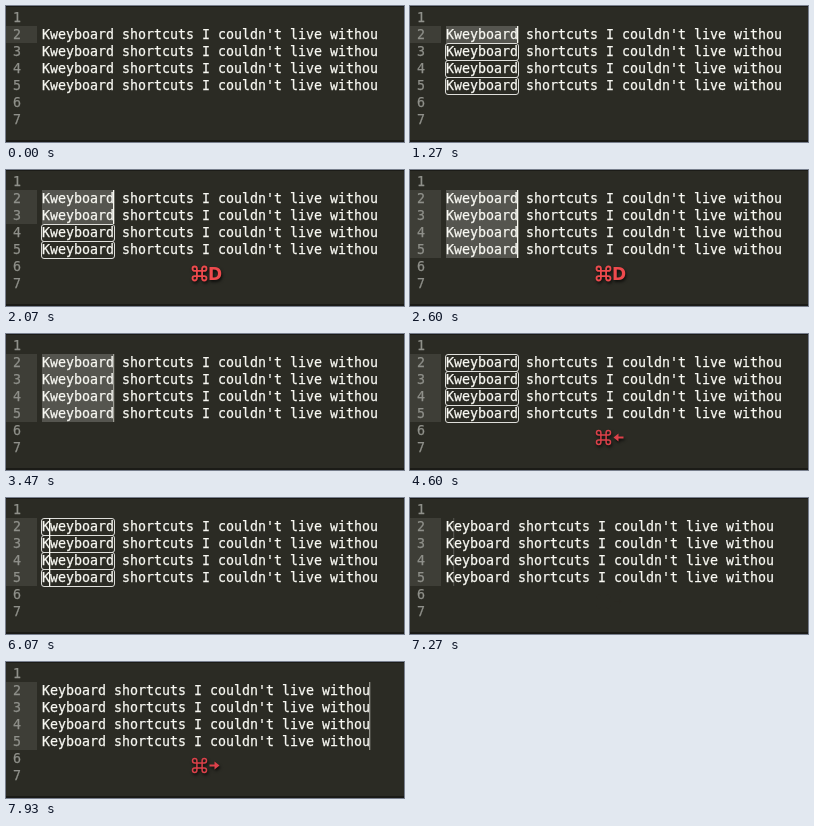
Recreate the animation shown at these times as an HTML page with a canvas. Size 398 by 136 pixels, loop 8 s.

```html
<!DOCTYPE html>
<html lang="en">
<head>
<meta charset="utf-8">
<title>Multiple cursors</title>
<style>
  html, body { margin: 0; width: 100%; height: 100%; overflow: hidden; background: #2b2b24; }
  canvas { display: block; }
</style>
</head>
<body>
<canvas id="stage" width="398" height="136"></canvas>
<script>
const ctx = document.getElementById('stage').getContext('2d');
const LOOP = 8000;
const CHAR = 8, ROW = 17, LEFT = 36, TOP = 3;
const WORD_LENGTH = 9, ROWS = [2, 3, 4, 5];
const REST = ' shortcuts I couldn\'t live withou';

// Editor states: selected rows, outlined rows, rows with a caret, caret column.
const states = [
  { at: 0, word: 'Kweyboard', selected: 0, outlined: [], carets: 1, column: null },
  { at: 1200, blinkFrom: 1270, word: 'Kweyboard', selected: 1, outlined: [3, 4, 5], carets: 1, column: 9 },
  { at: 1930, word: 'Kweyboard', selected: 2, outlined: [4, 5], carets: 2, column: 9 },
  { at: 2200, word: 'Kweyboard', selected: 3, outlined: [5], carets: 3, column: 9 },
  { at: 2470, word: 'Kweyboard', selected: 4, outlined: [], carets: 4, column: 9 },
  { at: 3930, word: 'Kweyboard', selected: 0, outlined: ROWS, carets: 4, column: 0 },
  { at: 4930, word: 'Kweyboard', selected: 0, outlined: ROWS, carets: 4, column: 1 },
  { at: 6330, word: 'Keyboard', selected: 0, outlined: [], carets: 4, column: 1 },
  { at: 7470, word: 'Keyboard', selected: 0, outlined: [], carets: 4, column: 41 }
];

const cues = [
  { key: 'D', start: 1670, end: 2830 },
  { key: 'left', start: 3670, end: 4930 },
  { key: 'right', start: 7270, end: 9000 }
];

const clamp = x => Math.min(1, Math.max(0, x));
const ramp = (t, start, length) => clamp((t - start) / length);
const rowTop = row => TOP + (row - 1) * ROW;

function caretAlpha(age) {
  const phase = Math.max(0, age) % 1340;
  return 1 - ramp(phase, 340, 260) + ramp(phase, 900, 230);
}

// One glyph per cell keeps the columns on whole pixels.
function drawText(text, x, row, color) {
  ctx.fillStyle = ctx.strokeStyle = color;
  ctx.lineWidth = 0.25;
  [...text].forEach((char, i) => {
    ctx.fillText(char, x + i * CHAR, rowTop(row) + 13);
    ctx.strokeText(char, x + i * CHAR, rowTop(row) + 13);
  });
}

function drawEditor(t) {
  const state = states.filter(s => s.at <= t).pop();
  ctx.fillStyle = '#2b2b24';
  ctx.fillRect(0, 0, 398, 136);
  ctx.fillStyle = '#1b1b17';
  ctx.fillRect(0, 0, 398, 1);
  ctx.fillRect(0, 134, 398, 2);

  ctx.fillStyle = '#3e3e37';
  ctx.fillRect(0, rowTop(2), 31, state.carets * ROW);
  ctx.fillStyle = '#55554f';
  ctx.fillRect(LEFT, rowTop(2), WORD_LENGTH * CHAR, state.selected * ROW);

  ctx.font = '13.3px "DejaVu Sans Mono", monospace';
  for (let row = 1; row <= 7; row++) drawText(String(row), 7, row, '#8f908a');
  for (const row of ROWS) drawText(state.word + REST, LEFT, row, '#f8f8f2');

  ctx.strokeStyle = '#dededa';
  ctx.lineWidth = 1;
  for (const row of state.outlined) {
    ctx.beginPath();
    ctx.roundRect(LEFT - 0.5, rowTop(row) + 0.5, WORD_LENGTH * CHAR + 1, ROW, 2.5);
    ctx.stroke();
  }

  if (state.column !== null) {
    ctx.globalAlpha = caretAlpha(t - (state.blinkFrom ?? state.at));
    ctx.fillStyle = '#f8f8f0';
    ctx.fillRect(LEFT + state.column * CHAR - 1, rowTop(2), 1.3, state.carets * ROW);
    ctx.globalAlpha = 1;
  }
}

// Looped square: a side and a three-quarter loop, turned four times.
function drawCommand(x, y, side, radius) {
  const reach = side + radius;
  ctx.save();
  ctx.translate(x, y);
  ctx.beginPath();
  for (let i = 0; i < 4; i++) {
    ctx.moveTo(side, -reach);
    ctx.lineTo(side, reach);
    ctx.arc(reach, reach, radius, Math.PI, -Math.PI / 2, true);
    ctx.rotate(Math.PI / 2);
  }
  ctx.stroke();
  ctx.restore();
}

function drawArrow(x, y, direction) {
  ctx.save();
  ctx.translate(x, y);
  ctx.scale(direction, 1);
  ctx.beginPath();
  ctx.moveTo(5, 0);
  ctx.lineTo(0, -4);
  ctx.lineTo(0, -1);
  ctx.lineTo(-5, -1);
  ctx.lineTo(-5, 1);
  ctx.lineTo(0, 1);
  ctx.lineTo(0, 4);
  ctx.fill();
  ctx.restore();
}

function drawCue(cue, t) {
  const alpha = ramp(t, cue.start, 330) - ramp(t, cue.end, 280);
  if (alpha <= 0) return;
  ctx.save();
  ctx.globalAlpha = alpha;
  ctx.shadowColor = 'rgba(0, 0, 0, 0.75)';
  ctx.shadowBlur = 3;
  ctx.shadowOffsetX = 1;
  ctx.shadowOffsetY = 2;
  ctx.fillStyle = ctx.strokeStyle = cue.key === 'D' ? '#ee4a4d' : '#dc414a';
  ctx.lineWidth = cue.key === 'D' ? 1.8 : 1.5;
  drawCommand(193.5, 103.5, 2.6, 2.2);
  if (cue.key === 'D') {
    ctx.font = 'bold 17px "DejaVu Sans", sans-serif';
    ctx.fillText('D', 202, 110);
  } else {
    drawArrow(208.5, 103.5, cue.key === 'left' ? -1 : 1);
  }
  ctx.restore();
}

const begin = performance.now();
function render() {
  const t = (performance.now() - begin) % LOOP;
  drawEditor(t);
  cues.forEach(cue => drawCue(cue, t));
  requestAnimationFrame(render);
}
render();
</script>
</body>
</html>
```
